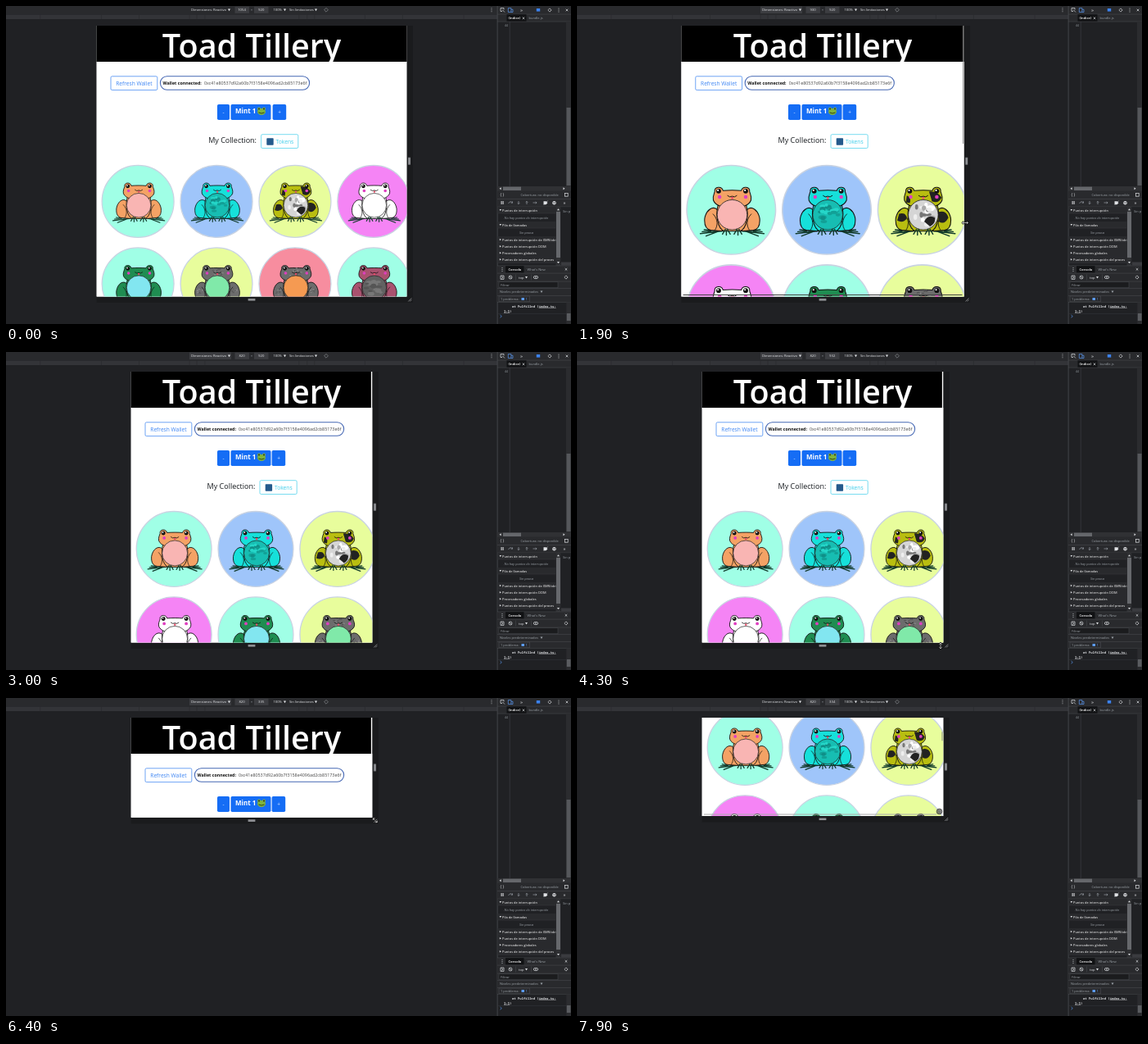
Animation, 690 px wide and 388 px high, one loop 8 s. Source, as an HTML page:

```html
<!DOCTYPE html>
<html lang="en">
<head>
<meta charset="utf-8">
<title>Responsive page test</title>
<style>
html, body { margin: 0; width: 100%; height: 100%; overflow: hidden; background: #202124; }
svg { display: block; width: 100vw; height: 100vh; }
text { font-family: "Open Sans", "Noto Sans", sans-serif; white-space: pre; }
.mono { font-family: "Noto Sans Mono", "DejaVu Sans Mono", monospace; }
</style>
</head>
<body>
<svg id="stage" viewBox="0 0 690 388"></svg>
<script>
const LOOP = 8000, TOP = 24, K = 0.3592, MID = 300;
const $ = id => document.getElementById(id);
const set = (id, attrs) => { for (const k in attrs) $(id).setAttribute(k, attrs[k]); };
const show = (id, on) => { $(id).style.display = on ? '' : 'none'; };

const rect = (x, y, w, h, fill, more = '') =>
  `<rect x="${x}" y="${y}" width="${w}" height="${h}" fill="${fill}" ${more}/>`;
const text = (x, y, s, size, fill, more = '') =>
  `<text x="${x}" y="${y}" font-size="${size}" fill="${fill}" ${more}>${s}</text>`;
const line = (d, stroke, w = 0.7, more = '') =>
  `<path d="${d}" fill="none" stroke="${stroke}" stroke-width="${w}" ${more}/>`;
const dot = (x, y, r, fill, more = '') =>
  `<circle cx="${x}" cy="${y}" r="${r}" fill="${fill}" ${more}/>`;
const mid = 'text-anchor="middle"', bold = 'font-weight="600"';

let seed = 7;
const rnd = () => (seed = seed * 16807 % 2147483647) / 2147483647;

function blobs(n, cx, cy, spread, size, tones) {
  let s = '';
  for (let i = 0; i < n; i++) {
    const a = rnd() * 6.283, d = Math.sqrt(rnd()) * spread;
    s += `<ellipse cx="${(cx + d * Math.cos(a)).toFixed(1)}" cy="${(cy + d * Math.sin(a)).toFixed(1)}"
      rx="${(size * (0.5 + rnd())).toFixed(1)}" ry="${(size * (0.4 + rnd() * 0.6)).toFixed(1)}" fill="${tones[i % tones.length]}"/>`;
  }
  return s;
}

// Each frog sits in a disc of radius 46.5 around its own centre.
const frogs = [
  { disc: '#a0ffe6', skin: '#f4a265', belly: '#f9b5b3' },
  { disc: '#9fc5fa', skin: '#16e0da', belly: '#17bdb2', spots: ['#12a096', '#25d6c8', '#0f8f88'] },
  { disc: '#e8fd9c', skin: '#b9be10', belly: '#d5d5d5', spots: ['#fff', '#aaa', '#777', '#eee'], patch: true },
  { disc: '#f584f5', skin: '#ffffff', belly: '#ffffff' },
  { disc: '#a0ffe6', skin: '#1f8d51', belly: '#82e6f0' },
  { disc: '#e8fd9c', skin: '#6c6c6c', belly: '#80e9a9', rough: true },
  { disc: '#f78d9f', skin: '#6c6c6c', belly: '#f59a52', rough: true },
  { disc: '#a0ffe6', skin: '#a9526f', belly: '#626262', spots: ['#555', '#777'] }
];

function frog(f, i) {
  const ink = 'stroke="#111" stroke-width=".9" stroke-linejoin="round"';
  const side = `
    ${line('M-11 22L-29 20.5M-12 22L-33 24.5M-14 22L-27 27M-22 22L-31 22.5', '#123b2b', 1.2, 'stroke-linecap="round"')}
    <path d="M-15 0C-20 -5 -27 0 -28.5 9C-29 16 -27 20 -22 21L-9 22Z" fill="${f.skin}" ${ink}/>
    ${line('M-20 4C-14 10 -15 17 -18 21', '#111', 0.7)}`;
  const toes = line('M-7 20L-10 25M-6 21L-6 26M-5 20L-2 25', '#123b2b', 1.2, 'stroke-linecap="round"');
  const patch = f.patch
    ? '<path d="M6 -19Q14 -20 19 -13Q16 -6 9 -9ZM-25 4Q-18 2 -17 9Q-21 14 -27 11ZM16 2Q24 0 26 8Q22 16 16 12ZM-17 -15Q-12 -13 -14 -7L-18 -8Z" fill="#222"/>' : '';
  const grit = ['#555', '#858585'];
  return `<g id="frog${i}">
    ${dot(0, 0, 46, f.disc, 'stroke="#c9d3e2" stroke-width="1.3"')}
    <g transform="translate(1 0)">
      ${side}<g transform="scale(-1 1)">${side}</g>
      <path d="M-14 -7C-18 4 -15 20 -8 22H8C15 20 18 4 14 -7Z" fill="${f.skin}" ${ink}/>
      <path d="M-19.5 -10C-20.5 -14 -18.5 -17 -18 -19C-19 -24.5 -10.5 -25 -9.5 -20C-4 -20.5 4 -20.5 9.5 -20C10.5 -25 19 -24.5 18 -19C18.5 -17 20.5 -14 19.5 -10C17 -4 8 -2 0 -2C-8 -2 -17 -4 -19.5 -10Z" fill="${f.skin}" ${ink}/>
      ${patch}
      ${f.rough ? blobs(26, 0, -12, 8, 1.1, grit) + blobs(8, -22, 10, 4, 1.1, grit) + blobs(8, 22, 10, 4, 1.1, grit) : ''}
      ${dot(0, 5, 15.5, f.belly, 'stroke="#222" stroke-width=".7"')}
      ${f.spots ? blobs(20, 0, 5, 11, 3, f.spots) : ''}
      ${f.patch ? '<path d="M1 12Q5 4 12 8Q13 14 7 17Z" fill="#222"/>' : ''}
      ${toes}<g transform="scale(-1 1)">${toes}</g>
      ${dot(-14, -19.5, 2.5, '#111')}${dot(14, -19.5, 2.5, '#111')}
      ${dot(-14.7, -20.3, 0.9, '#fff')}${dot(13.3, -20.3, 0.9, '#fff')}
      ${dot(-13, -13.5, 1.9, '#df3fc0')}${dot(14, -13.5, 1.9, '#df3fc0')}
      <path d="M-1.2 -13.5h2.6q0 2.6 -1.3 2.6t-1.3 -2.6" fill="#e8506a"/>
      ${line('M-5 -15Q-2.5 -12.5 0 -14.2Q2.5 -12.5 5 -15', '#111', 0.8)}
    </g></g>`;
}

function toolbar() {
  const white = '#e8eaed', field = '#3c3d41';
  let s = rect(0, 0, 600, 10, '#292a2d') + rect(0, 10.5, 600, 5.5, '#333438');
  for (const w of [320, 375, 425, 768, 1024, 1440])
    for (const d of [-1, 1]) s += rect(MID + d * w * K / 2, 10.5, 0.8, 5.5, '#2b2c2f');
  s += rect(224, 0.5, 51, 8.5, field, 'id="select"');
  s += text(226, 6.4, 'Dimensiones: Reactivo', 4.1, white) + rect(279.5, 0.8, 17.5, 8, field) + rect(303, 0.8, 17.5, 8, field);
  s += text(288, 6.4, '', 4.2, white, mid + ' id="wide"') + text(300, 6.4, '×', 4.2, '#9aa0a6', mid);
  s += text(311.7, 6.4, '', 4.2, white, mid + ' id="tall"');
  s += text(326.5, 6.4, '100%', 4.1, white) + text(346, 6.4, 'Sin limitaciones', 4.1, white);
  for (const x of [271, 339, 377]) s += `<path d="M${x} 3.6h3l-1.5 2.6z" fill="${white}"/>`;
  s += line('M388.6 4.8L391 2.4L393.4 4.8L391 7.2Z', '#8a8d91', 0.7);
  for (const y of [2.8, 4.8, 6.8]) s += dot(593, y, 0.5, '#c0c3c7');
  return s;
}

function devtools() {
  const white = '#e0e2e5', grey = '#9aa0a6', bar = '#292a2d', edge = '#4a4c50', blue = '#5c9bf5';
  const dots = (x, y) => [-2, 0, 2].map(d => dot(x, y + d, 0.5, white)).join('');
  const cross = (x, y) => line(`M${x - 1.3} ${y - 1.3}l2.6 2.6m0 -2.6l-2.6 2.6`, white, 0.7);
  const gear = (x, y) => dot(x, y, 1.7, 'none', `stroke="${white}" stroke-width="1" stroke-dasharray="1 .4"`);
  let s = rect(600, 0, 90, 388, '#202124') + rect(600, 0, 90, 19, bar) + rect(599.7, 0, 0.8, 388, edge);
  s += line('M604 2.5h4v2M604 2.5v4h2M606 4.5l3 3', white) + line('M613.3 2.5h3.6v5h-3.6zM617 4.3h2v3.2h-2', blue);
  s += text(628, 6.6, '»', 6, white) + rect(647.8, 3, 4.4, 3.6, '#3b82f0') + gear(664, 5) + dots(675, 5) + cross(685, 5);
  s += rect(600, 9.8, 90, 0.5, edge) + rect(611.5, 10.3, 24, 8.7, '#111214');
  s += text(613.5, 16.3, '(índice)', 4.2, '#fff', bold) + cross(632, 14.8) + text(638.5, 16.3, 'bundle.js', 4, grey);
  s += rect(600, 18.8, 90, 0.5, edge) + rect(614.8, 19, 0.7, 201, '#3c3e42') + text(609, 25, '44', 3.4, grey);
  s += rect(684, 19, 6, 201, '#2b2c2f') + rect(684.5, 124, 5, 95, '#55575b');
  s += rect(600, 220, 90, 5.8, '#303134') + rect(607, 220.6, 22, 4.4, '#65676b');
  s += `<path d="M604.6 221.2v3l-2 -1.5zM680.5 221.2v3l2 -1.5z" fill="${white}"/>`;

  s += rect(600, 226, 90, 19, bar) + rect(600, 235.2, 90, 0.5, edge) + rect(600, 244.8, 90, 0.5, edge);
  s += text(603.5, 232.4, '{ }', 4.6, white) + text(628.5, 232.2, 'Cobertura: no disponible', 4, grey);
  s += rect(682.6, 228.6, 3.6, 3.6, 'none', `stroke="${white}" stroke-width=".7"`);
  s += rect(604.6, 238, 1, 4, white) + rect(606.6, 238, 1, 4, white);
  s += line('M613.5 241q2.5 -4 5 -1m0 -1.6v1.8h-1.8M626 238v3.6m-1.3 -1.3l1.3 1.3l1.3 -1.3M636 242v-3.6m-1.3 1.3l1.3 -1.3l1.3 1.3M643.5 240h4.6m-1.3 -1.3l1.3 1.3l-1.3 1.3', grey);
  s += `<path d="M656.5 238.2h3l2 2l-2 2h-3z" fill="${white}"/>` + line('M657 242.4l4.6 -4.8', white);
  s += dot(669.5, 240.2, 2.2, white) + rect(668.6, 239, 0.6, 2.4, bar) + rect(669.9, 239, 0.6, 2.4, bar);
  s += text(680.5, 242, '»', 6, white);

  const rows = [[249, 1, 'Puntos de interrupción'], [267, 1, 'Pila de llamadas'],
    [285, 0, 'Puntos de interrupción de XMR/obt'], [293.2, 0, 'Puntos de interrupción DOM'],
    [301.2, 0, 'Procesadores globales'], [309.2, 0, 'Puntos de interrupción del proces']];
  for (const [y, open, label] of rows) {
    s += rect(600.5, y - 4, 71, 8, bar) + rect(600.5, y + 3.8, 71, 0.4, '#3c3e42');
    s += `<path d="${open ? `M602.5 ${y - 1}h2.6l-1.3 2z` : `M602.8 ${y - 1.3}v2.6l2 -1.3z`}" fill="${white}"/>`;
    s += text(606, y + 1.5, label, 4, '#fff', 'font-weight="500"');
  }
  s += text(635.5, 259.8, 'No hay puntos de interrupción', 4, grey, mid + ' font-style="italic"');
  s += text(635.5, 277.7, 'Sin pausa', 4, grey, mid + ' font-style="italic"');
  s += rect(671.5, 245.3, 6, 72, '#2f3033') + rect(672, 251, 5, 56, '#66686c');
  s += `<path d="M673 249.2h3l-1.5 -2zM673 312h3l-1.5 2z" fill="${white}"/>`;
  s += rect(677.5, 245.3, 12.5, 72, '#202124') + text(680, 252.3, 'Sin p', 4, grey);
  s += rect(678, 312.5, 12, 4, '#3a3b3f');

  s += rect(600, 317, 90, 44, bar) + rect(600, 316.7, 90, 0.5, edge) + rect(610, 317.2, 22.5, 8.4, '#111214');
  s += dots(606, 321.5) + text(613.5, 323, 'Consola', 4.1, '#fff', bold) + text(636.5, 323, 'What’s New', 4.1, grey) + cross(684, 321.3);
  for (const y of [325.8, 335.8, 344.4, 353.2, 361.2]) s += rect(600, y, 90, 0.5, edge);
  s += line('M604 329h4v4.4h-4zM605.2 329.8l1.8 1.4l-1.8 1.4', white);
  s += dot(616, 331, 2, 'none', `stroke="${white}" stroke-width=".7"`) + line('M614.6 329.6l2.8 2.8', white);
  s += rect(622, 327.5, 0.5, 7, edge) + text(626, 332.6, 'top', 4.1, white) + `<path d="M634 330h3l-1.5 2.4z" fill="${white}"/>`;
  s += rect(641, 327.5, 0.5, 7, edge);
  s += `<ellipse cx="647" cy="331" rx="2.8" ry="1.7" fill="none" stroke="${white}" stroke-width=".7"/>` + dot(647, 331, 0.8, white) + gear(684, 331);
  s += rect(602, 336.8, 72, 7, '#1b1c1e', `stroke="${edge}" stroke-width=".5"`) + text(604, 341.8, 'Filtrar', 4, grey);
  s += text(603, 350.2, 'Niveles predeterminados', 4, grey) + `<path d="M652.5 347.5h3l-1.5 2.4z" fill="${grey}"/>`;
  s += rect(602, 354, 37.5, 6.8, 'none', `stroke="${edge}" stroke-width=".6"`) + text(604, 358.9, '1 problema:', 4, grey) + rect(629.5, 356, 3.5, 3, blue) + text(634.5, 358.9, '1', 4, blue);
  const code = `class="mono" font-weight="600"`;
  s += text(618, 367.6, 'at Fulfilled (<tspan text-decoration="underline">index.ts:</tspan>', 3.9, white, code);
  s += text(608, 373.6, '<tspan text-decoration="underline">1:1</tspan>)', 3.9, white, code);
  s += rect(600.5, 375.3, 84, 0.4, '#3c3e42') + line('M603.5 377l1.8 1.6l-1.8 1.6', blue);
  s += rect(684.3, 361.5, 5.7, 26.5, '#2b2c2f') + rect(684.8, 375, 4.7, 9, '#5a5c60');
  return s;
}

function page() {
  const blue = '#156df5', sky = '#3fcdea';
  const btn = (x, w) => rect(x, 120, w, 19, blue, 'rx="1.8"');
  return `<g clip-path="url(#view)">${rect(0, 0, 600, 388, '#fff')}
    <g id="content">
      ${rect(0, TOP, 600, 44, '#000')}
      ${text(MID, 63, 'Toad Tillery', 39.6, '#fff', mid + ' ' + bold)}
      ${rect(0, 68, 600, 700, '#fff')}
      <g id="wallet">
        ${rect(17.3, 85.8, 56.8, 16.8, '#fff', `rx="1.6" stroke="#4b8df2" stroke-width=".8"`)}
        ${text(45.7, 96.8, 'Refresh Wallet', 6.6, '#3d85f3', mid)}
        ${rect(77.7, 85.8, 182.2, 16.4, '#fff', 'rx="8.2" stroke="#4668b4" stroke-width="1.1"')}
        ${text(80.8, 95.6, 'Wallet connected:', 5.3, '#111', 'font-weight="700"')}
        ${text(256.6, 95.6, '0xc41e80537d92a60b7f3158e4096ad2cb85173e6f', 5.36, '#444', 'text-anchor="end"')}
      </g>
      ${btn(258, 15)}${text(265.5, 132, '-', 6.5, '#cfe0ff', mid)}
      ${btn(274.5, 49)}${text(280, 131.3, 'Mint 1', 8, '#fff', 'font-weight="700"')}
      <ellipse cx="312" cy="129" rx="5" ry="4" fill="#7fb43c"/>
      ${dot(309, 125.5, 1.9, '#7fb43c')}${dot(315, 125.5, 1.9, '#7fb43c')}${dot(309, 125.5, 0.9, '#222')}${dot(315, 125.5, 0.9, '#222')}
      ${line('M308.5 130q3.5 2 7 0', '#2b3d12', 0.9)}
      <g id="plus">${btn(325.6, 16.6)}${text(334, 132.4, '+', 6.5, '#cfe0ff', mid)}</g>
      <g id="tokens">
        ${text(306, 167, 'My Collection:', 9, '#161a1e', 'text-anchor="end" font-weight="500"')}
        ${rect(311.6, 156.7, 45.2, 16.8, '#fff', `rx="1.6" stroke="${sky}" stroke-width=".7"`)}
        ${rect(318.3, 161.3, 8.4, 8.4, '#245a8c', 'rx=".8"')}
        ${text(329.5, 168, 'Tokens', 6.7, sky)}
      </g>
      ${frogs.map(frog).join('')}
    </g>
    ${rect(0, TOP, 1.4, 44, '#fff', 'id="gap"')}
    ${rect(0, 0, 1, 1, '#8a8a8a', 'id="barV" rx=".5"')}
    ${rect(0, 0, 1, 1, '#555', 'id="barH" rx=".5"')}
  </g>`;
}

const arrowPath = 'M-4 0H4M-2.2 -1.8L-4 0L-2.2 1.8M2.2 -1.8L4 0L2.2 1.8';
const arrows = line(arrowPath, '#000', 2) + line(arrowPath, '#fff', 0.8);

$('stage').innerHTML = `
  <defs><clipPath id="view"><rect id="viewBoxRect" y="${TOP}"/></clipPath></defs>
  ${rect(0, 0, 690, 388, '#202124')}
  ${rect(0, TOP, 8, 8, '#1a1b1d', 'id="rim"')}
  ${page()}
  <g id="gripR">${rect(-1.5, -4.5, 3, 9, '#77797d')}${line('M-.5 -3.5v7M.7 -3.5v7', '#a9abaf', 0.5)}</g>
  <g id="gripB">${rect(-4.5, -1.3, 9, 2.6, '#77797d')}${line('M-4 -.5h8M-4 .7h8', '#b5b7bb', 0.5)}</g>
  <g id="corner">${line('M-2 2L2 -2M0 2L2 0', '#a9abaf', 0.7)}</g>
  ${toolbar()}${devtools()}
  <path id="arrow" d="M0 0V8L2 6.3L3.3 9L4.5 8.4L3.3 5.8H5.8Z" fill="#fff" stroke="#000" stroke-width=".5"/>
  <g id="sizer">${arrows}</g>
  ${dot(0, 0, 3.4, '#555', 'id="touch" fill-opacity=".75" stroke="#333" stroke-width=".6"')}`;

function at(keys, t) {
  if (t <= keys[0][0]) return keys[0][1];
  for (let i = 1; i < keys.length; i++) {
    const [a, u] = keys[i - 1], [b, v] = keys[i];
    if (t < b) return u + (v - u) * (t - a) / (b - a);
  }
  return keys[keys.length - 1][1];
}
const span = (t, a, b) => Math.min(1, Math.max(0, (t - a) / (b - a)));
const ease = p => p * p * (3 - 2 * p);

const widths = [[1400, 1054], [1600, 1031], [1700, 1022], [2300, 838], [2400, 826], [2550, 820]];
const heights = [[4300, 920], [4900, 993], [5700, 993], [5900, 950], [6100, 710], [6300, 410], [6400, 339], [6500, 335], [6600, 334]];

// The labels run one step ahead of the page while dragging.
function draw(ms) {
  const t = Math.floor(ms / 100) * 100;
  const wide = at(widths, t), w = wide * K, h = at(heights, t) * K;
  const x = MID - w / 2, right = x + w, bottom = TOP + h;
  const scroll = 180 * ease(span(t, 6800, 7800));
  const cols = wide >= 992 ? 4 : 3;

  set('viewBoxRect', { x, width: w, height: h });
  set('rim', { x, width: w + 7.5, height: h + 7.5 });
  set('content', { transform: `translate(0 ${-scroll})` });
  set('wallet', { transform: `translate(${x} 0)` });
  set('plus', { transform: `translate(${cols < 4 ? -1 : 0} 0)` });
  set('tokens', { transform: `translate(${cols < 4 ? -1.6 : 0} 0)` });

  const pitch = (w + 5) / cols, r = (pitch - 7) / 2;
  frogs.forEach((f, i) => {
    const cx = x + 6 + r + (i % cols) * pitch;
    const cy = 194 + r + Math.floor(i / cols) * (2 * r + 11.6);
    set('frog' + i, { transform: `translate(${cx} ${cy}) scale(${r / 46.5})` });
  });

  const sizing = t >= 1500 && t < 2600, moving = t >= 6900;
  show('gap', t >= 2600 && !moving);
  set('gap', { x: right - 1.4 });
  show('barV', sizing || moving);
  set('barV', moving ? { x: right - 1.8, y: 26 + scroll * 0.085, height: 11 } : { x: right - 1.4, y: TOP, height: 144 });
  show('barH', sizing || moving);
  set('barH', { x: x + 2, y: bottom - 2.4, width: w - (moving ? 10 : 4), fill: moving ? '#aaa' : '#444' });

  set('gripR', { transform: `translate(${right + 3.2} ${TOP + h / 2})` });
  set('gripB', { transform: `translate(${MID} ${bottom + 3.8})` });
  set('corner', { transform: `translate(${right + 4} ${bottom + 4})` });

  const tall = at(heights, t + 100);
  $('wide').textContent = Math.round(at(widths, t + 100));
  $('tall').textContent = Math.round(tall);
  set('tall', { opacity: tall > 985 ? 0.35 : 1 });
  show('select', t >= 1500 && !moving);

  const go = ease(span(t, 600, 1300));
  show('arrow', t >= 700 && t < 1300);
  set('arrow', { transform: `translate(${672 - 180 * go} ${358 - 94 * go})` });

  show('sizer', (t >= 1300 && t < 2600) || (t >= 4200 && t < 6800));
  const cursor = t < 2600 ? [right + 1.5, 264.5, 0]
    : t < 6000 ? [444, bottom + 4, 90] : [right + 3.5, bottom + 3.5, 45];
  set('sizer', { transform: `translate(${cursor[0]} ${cursor[1]}) rotate(${cursor[2]}) scale(.85)` });
  show('touch', t >= 6800);
  set('touch', { cx: 442.5, cy: 138.5 });
}

function tick() {
  draw(performance.now() % LOOP);
  requestAnimationFrame(tick);
}
tick();
</script>
</body>
</html>
```
